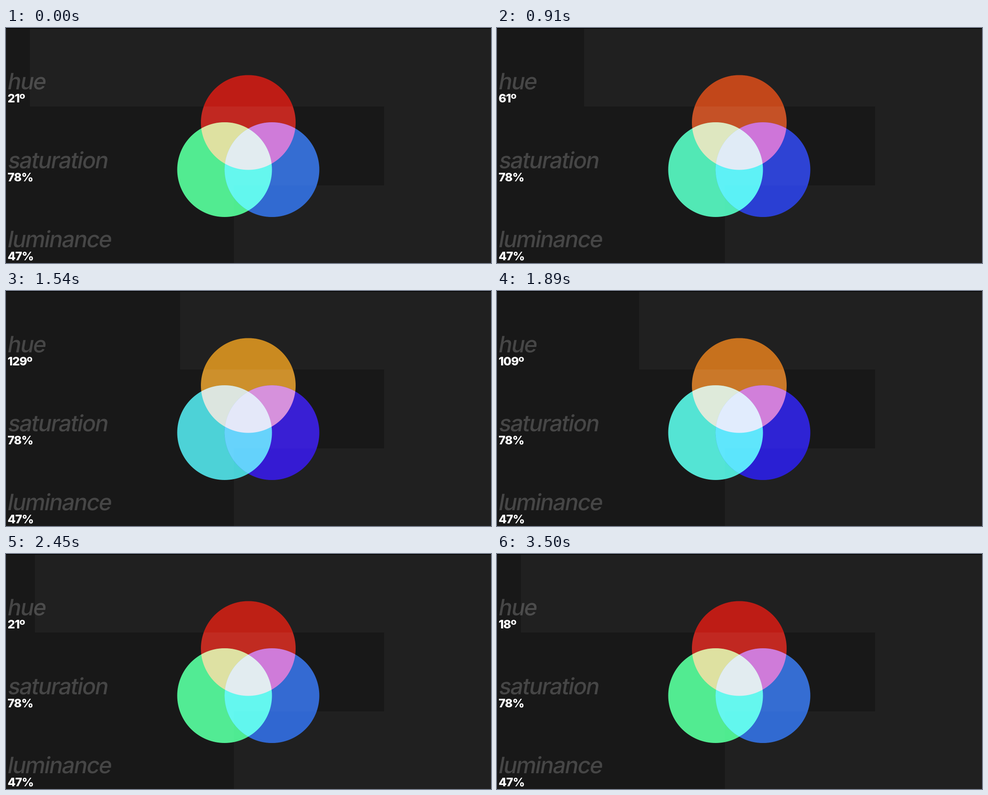
Recreate the animation shown at these times as an HTML page with a canvas. Size 1075 by 521 pixels, loop 3.57 s.

```html
<!DOCTYPE html>
<html lang="en">
<head>
<meta charset="utf-8">
<title>Hue, saturation, luminance</title>
<style>
  html, body { margin: 0; width: 100%; height: 100%; overflow: hidden; background: #202020; }
  canvas, svg { position: absolute; left: 0; top: 0; width: 1075px; height: 521px; }
  text { font-family: Inter, "Liberation Sans", sans-serif; fill: #fff; }
  .label { font-size: 50px; font-weight: 450; letter-spacing: -1.9px; fill-opacity: .2; }
  .value { font-size: 26px; font-weight: 800; letter-spacing: -.9px; }
</style>
</head>
<body>
<canvas id="stage"></canvas>
<svg viewBox="0 0 1075 521">
  <text class="label" transform="translate(1.5 136) skewX(-10)">hue</text>
  <text class="value" x="3.5" y="165" id="hue">21º</text>
  <text class="label" transform="translate(2.5 311) skewX(-10)">saturation</text>
  <text class="value" x="3.5" y="340">78%</text>
  <text class="label" transform="translate(1.5 486) skewX(-10)">luminance</text>
  <text class="value" x="3.5" y="515">47%</text>
</svg>
<script>
const W = 1075, H = 521, LOOP = 3570, STEP = 70;
const ROW2 = 174, ROW3 = 349, SAT_X = 838, LUM_X = 505;
const TEXT_LAG = 16;
const SCALE = 2; // supersampling for clean overlaps
const canvas = document.getElementById('stage');
const ctx = canvas.getContext('2d');
const hueText = document.getElementById('hue');
canvas.width = W * SCALE;
canvas.height = H * SCALE;
ctx.scale(SCALE, SCALE);

// Drag of the hue slider: time, degrees, speed
const DRAG = [
  [490, 17.8, 0], [910, 64.6, .225], [1050, 100.8, .22], [1190, 121, .06],
  [1540, 129.3, 0], [1680, 129.3, 0], [2030, 57.3, -.45], [2170, 34, -.08],
  [2450, 21.4, -.01], [2700, 17.8, 0]
];

const CIRCLES = [[537, 209.5], [484.5, 314], [589.5, 314]];
const RADIUS = 105;

// Circles covering each area, in paint order
const AREAS = [[0], [1], [2], [0, 1], [0, 2], [1, 2], [0, 1, 2]];

// Area colours at given hues
const PALETTE = [
  [17.8, 'c12821 52eb91 356dd2 dee1a1 cf7bd9 65f7ee e2ecf0'],
  [64.6, 'c55126 52e8b5 2e43d4 dee7c0 ce75d9 5ef1f6 e0ebf6'],
  [100.8, 'c97428 55e7d4 2c24d4 deebd9 d07cda 5ee9fc e1edfe'],
  [129.3, 'cd902c 4dd2d7 391fd4 dce5df d691dc 67d3fb e4e8f9']
].map(([hue, list]) => [hue, list.split(' ').map(rgb)]);

function rgb(hex) {
  return [0, 2, 4].map(i => parseInt(hex.slice(i, i + 2), 16));
}

function hueAt(t) {
  if (t <= DRAG[0][0]) return DRAG[0][1];
  const i = DRAG.findIndex(p => t <= p[0]);
  if (i < 0) return DRAG[DRAG.length - 1][1];
  const [t0, a, va] = DRAG[i - 1], [t1, b, vb] = DRAG[i];
  const d = t1 - t0, u = (t - t0) / d, v = 1 - u;
  return a * v * v * (1 + 2 * u) + b * u * u * (3 - 2 * u) + d * u * v * (va * v - vb * u);
}

function colorsAt(hue) {
  let i = 1;
  while (i < PALETTE.length - 1 && hue > PALETTE[i][0]) i++;
  const [h0, from] = PALETTE[i - 1], [h1, to] = PALETTE[i];
  const k = (hue - h0) / (h1 - h0);
  return from.map((c, n) => c.map((x, j) => x + (to[n][j] - x) * k));
}

const css = c => `rgb(${c.map(x => Math.max(0, Math.round(x))).join()})`;

function rect(color, x, y, w, h) {
  ctx.fillStyle = color;
  ctx.fillRect(x, y, w, h);
}

function circlePath(i) {
  ctx.beginPath();
  ctx.arc(...CIRCLES[i], RADIUS, 0, Math.PI * 2);
}

function drawCircles(colors) {
  AREAS.forEach((area, n) => {
    ctx.save();
    area.slice(1).forEach(i => { circlePath(i); ctx.clip(); });
    ctx.fillStyle = css(colors[n]);
    circlePath(area[0]);
    ctx.fill();
    ctx.restore();
  });
}

// Deeper tones where the lighter background shows through
function drawDeeper(colors, depth, x, y, w, h) {
  ctx.save();
  ctx.beginPath();
  ctx.rect(x, y, w, h);
  ctx.clip();
  drawCircles(colors.map(c => c.map(v => v - (255 - v) * depth)));
  ctx.restore();
}

function draw(t) {
  const hue = hueAt(t), colors = colorsAt(hue);
  rect('#202020', 0, 0, W, H);
  rect('#181818', 0, 0, Math.round(hue / 360 * W), ROW2);
  rect('#181818', 0, ROW2, SAT_X, ROW3 - ROW2);
  rect('#181818', 0, ROW3, LUM_X, H - ROW3);
  rect('#000', 0, 0, W, 1.5);

  drawCircles(colors);
  drawDeeper(colors, .055, 0, 0, W, ROW2);
  drawDeeper(colors, .02, LUM_X, ROW3, W - LUM_X, H - ROW3);

  const shown = t < STEP ? 21 : Math.floor(hueAt(t - TEXT_LAG) + .3);
  hueText.textContent = shown + 'º';
}

const start = performance.now();
function tick() {
  const t = (performance.now() - start) % LOOP;
  draw(Math.floor(t / STEP) * STEP);
  requestAnimationFrame(tick);
}
tick();
</script>
</body>
</html>
```
